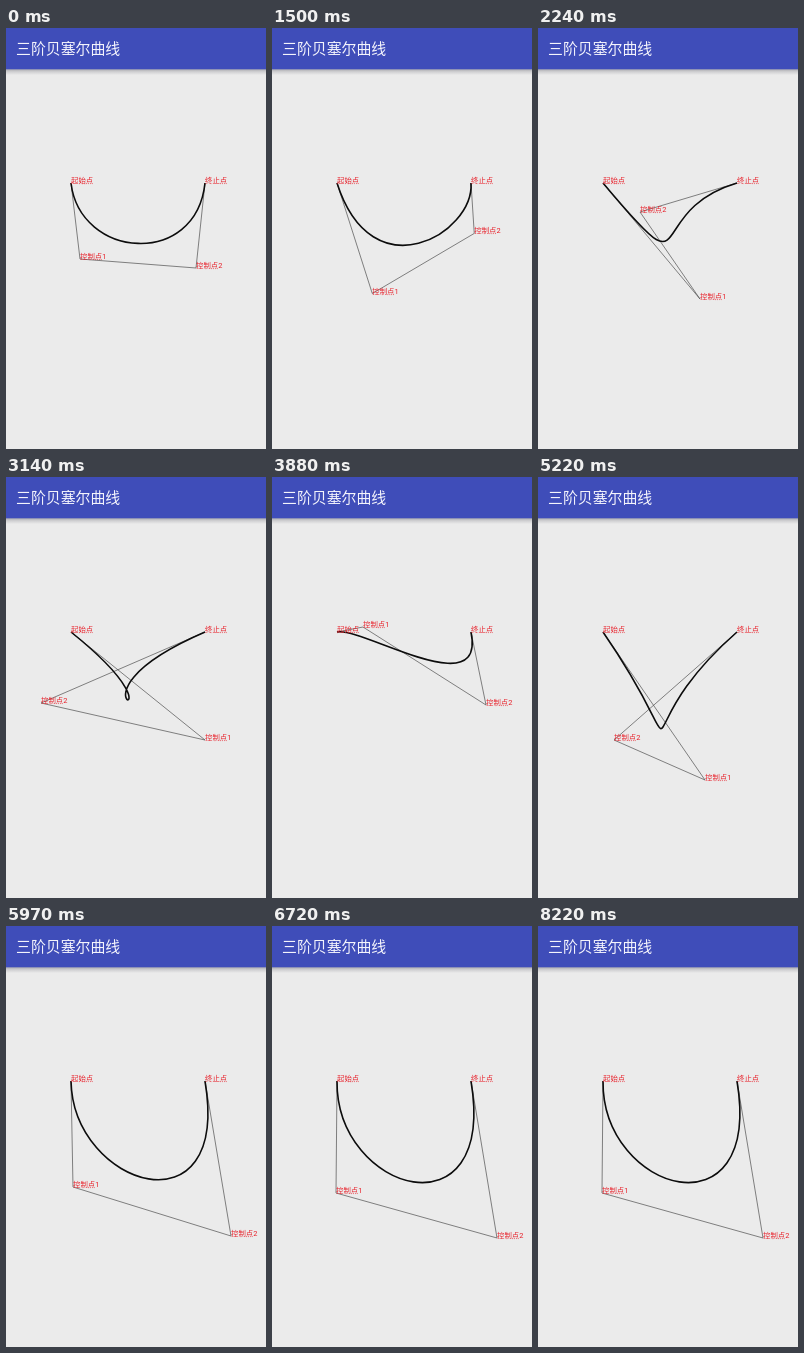
An HTML page for the animation above (8.42 s loop, 260 px wide and 421 px high).

```html
<!DOCTYPE html>
<html lang="zh-CN">
<head>
<meta charset="utf-8">
<title>三阶贝塞尔曲线</title>
<style>
  html, body { margin: 0; width: 100%; height: 100%; overflow: hidden; background: #ebebeb; }
  svg { display: block; width: 100vw; height: 100vh; }
  text { font-family: Roboto, "Noto Sans CJK SC", "Noto Sans CJK", sans-serif; }
  .title { font-size: 14.9px; fill: #f4f4fc; }
  .label { font-size: 7.4px; fill: #e8202a; }
  .guide { fill: none; stroke: #505050; stroke-width: .7; }
  .curve { fill: none; stroke: #0c0c0c; stroke-width: 1.6; }
</style>
</head>
<body>
<svg viewBox="0 0 260 421" preserveAspectRatio="none">
  <defs>
    <linearGradient id="shade" x2="0" y2="1">
      <stop offset="0" stop-color="#a9a9ae"/>
      <stop offset=".45" stop-color="#cfcfd1"/>
      <stop offset="1" stop-color="#ebebeb"/>
    </linearGradient>
  </defs>
  <rect width="260" height="421" fill="#ebebeb"/>
  <rect y="41" width="260" height="6" fill="url(#shade)"/>
  <rect width="260" height="41.3" fill="#3f4db9"/>
  <text class="title" x="10" y="26">三阶贝塞尔曲线</text>
  <path id="guide" class="guide"/>
  <path id="curve" class="curve"/>
  <text class="label" x="65" y="155">起始点</text>
  <text class="label" x="199" y="155">终止点</text>
  <text class="label" id="label1">控制点1</text>
  <text class="label" id="label2">控制点2</text>
</svg>
<script>
const LOOP = 8420, DRAG_START = 1050, STEP = 149.17;
const LAST_DRAG = 36, REST_STEP = 38;
const REST = [64, 267, 225, 312];

// step, control point 1 (x, y), control point 2 (x, y)
const drag = [
  [-1, 74, 231, 190, 240],
  [2, 88, 258, 211, 222],
  [5, 130, 276, 168, 172],
  [8, 162, 271, 102, 184],
  [11, 188, 272, 56, 206],
  [14, 199, 263, 35, 226],
  [16, 162, 274, 92, 180],
  [17, 128, 240, 150, 165],
  [19, 91, 150, 214, 228],
  [22, 95, 240, 196, 214],
  [24, 134, 294, 152, 208],
  [26, 158, 305, 108, 232],
  [28, 167, 303, 76, 263],
  [30, 174, 312, 29, 276],
  [32, 94, 290, 180, 268],
  [33, 67, 261, 225, 310],
  [36, 57, 265, 225, 312]
];

function slope(i, axis) {
  if (i === 0 || i === drag.length - 1) return 0;
  const a = drag[i - 1], b = drag[i + 1];
  return (b[axis] - a[axis]) / (b[0] - a[0]);
}

// Cubic Hermite path through the drag positions
function controlsAt(step) {
  if (step >= REST_STEP) return REST;
  const k = Math.min(step, LAST_DRAG);
  let i = 0;
  while (i < drag.length - 2 && drag[i + 1][0] <= k) i++;
  const a = drag[i], b = drag[i + 1], span = b[0] - a[0];
  const u = (k - a[0]) / span, v = 1 - u;
  return [1, 2, 3, 4].map(n =>
    v * v * (1 + 2 * u) * a[n] + u * u * (3 - 2 * u) * b[n] +
    span * u * v * (v * slope(i, n) - u * slope(i + 1, n)));
}

const el = id => document.getElementById(id);
const [guide, curve, label1, label2] = ["guide", "curve", "label1", "label2"].map(el);

function place(label, x, y) {
  label.setAttribute("x", x);
  label.setAttribute("y", y);
}

function draw(time) {
  const t = time % LOOP;
  // The small lead absorbs rounding of the step times
  const step = Math.max(-1, Math.floor((t - DRAG_START + 8) / STEP));
  const [x1, y1, x2, y2] = controlsAt(t < DRAG_START ? -1 : step);
  guide.setAttribute("d", `M65 155L${x1} ${y1}L${x2} ${y2}L199 155`);
  curve.setAttribute("d", `M65 155C${x1} ${y1} ${x2} ${y2} 199 155`);
  place(label1, x1, y1);
  place(label2, x2, y2);
}

const start = performance.now();
function tick() {
  draw(performance.now() - start);
  requestAnimationFrame(tick);
}
tick();
</script>
</body>
</html>
```
